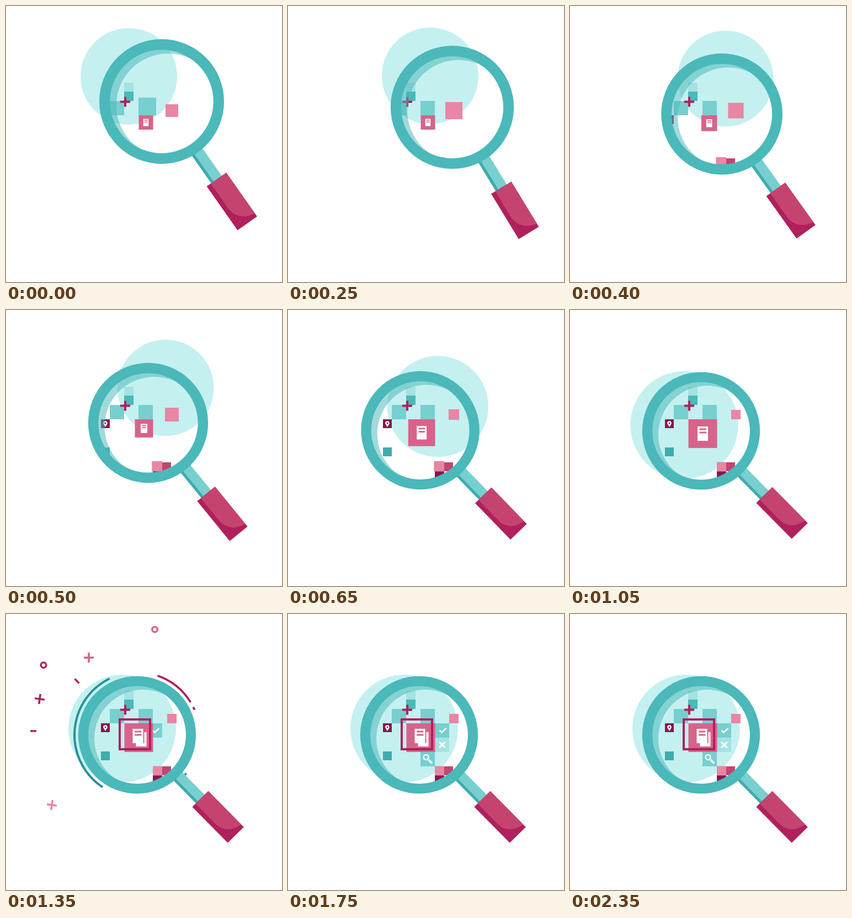
Animation of 500x500 px, one loop 2.4 s. Source, as an HTML page with a canvas:

```html
<!DOCTYPE html>
<html lang="en">
<head>
<meta charset="utf-8">
<title>Magnifier</title>
<style>
html, body { margin: 0; width: 100%; height: 100%; overflow: hidden; background: #fff; }
canvas { display: block; width: 500px; height: 500px; }
</style>
</head>
<body>
<canvas id="stage" width="500" height="500"></canvas>
<script>
const ctx = document.getElementById('stage').getContext('2d');
const LOOP = 2400, STEP = 50, DEG = Math.PI / 180;
const C = {
  pale: '#c4f0f0', ring: '#4bb8ba', teal: '#78cfcf', mist: '#a5e2e2', deep: '#3fabae', arc: '#2a9095',
  crimson: '#b0205c', rose: '#c4446f', pink: '#d6648a', light: '#e886a4', plum: '#85194f', white: '#fff'
};

// Rows: time, then values. Smooth curves run through every row.
const LENS = [
  [0, 282, 173, 1.06, 54.9], [250, 297.5, 183.5, 1.047, 58.65], [500, 257.5, 204.5, 1.019, 50.8],
  [750, 232.5, 224, 1, 43.7], [1000, 237.5, 219, 1, 45.4]
];
const DISC = [
  [0, 222.5, 127.5, 87.5], [250, 257.5, 126.5, 87.5], [500, 289, 141, 87.3],
  [750, 251.5, 196.5, 94.5], [950, 202, 209.5, 97.5], [1100, 210.5, 207.5, 97.5]
];
const BLOCK = [[0, 32], [250, 26]];
const DOT = [[0, 23], [250, 31], [500, 25], [750, 17]];
const BOOK = [[0, 26], [250, 26], [500, 33], [750, 57], [1000, 52]];
const CORNER = [[0, 18.5], [750, 18.5], [1000, 17]];
const LEFT_ARC = [[1100, 185, 185], [1350, 123.3, 244], [1650, 138, 190]];
const RIGHT_ARC = [[1100, -60, -60], [1350, -71, -31.4], [1650, -36, -26]];

// Kind, x, y, rotation, colour.
const SPARKS = [
  ['ring', 68, 92.5, 0, C.crimson], ['ring', 269.5, 28, 0, C.pink],
  ['plus', 150, 79, 0, C.pink], ['plus', 61, 154, 8, C.crimson], ['plus', 83, 346, 8, C.light],
  ['dash', 128.5, 121.5, 45, C.crimson], ['dash', 49.5, 212, 0, C.crimson]
];

const ramp = (t, a, b) => Math.min(1, Math.max(0, (t - a) / (b - a)));
const easeOut = p => 1 - (1 - p) ** 3;

function track(keys, t) {
  const last = keys.length - 1;
  if (t <= keys[0][0]) return keys[0].slice(1);
  if (t >= keys[last][0]) return keys[last].slice(1);
  let i = 0;
  while (t >= keys[i + 1][0]) i++;
  const a = keys[i], b = keys[i + 1], h = b[0] - a[0], p = (t - a[0]) / h;
  const slope = (k, j) => {
    if (k === last) return 0;
    const m = keys[Math.max(0, k - 1)], n = keys[k + 1];
    return (n[j] - m[j]) / (n[0] - m[0]) * h;
  };
  return a.slice(1).map((v, k) => {
    const j = k + 1, d = b[j] - v, u = slope(i, j), w = slope(i + 1, j);
    return v + p * (u + p * (3 * d - 2 * u - w + p * (u + w - 2 * d)));
  });
}

function box(x, y, w, h, color) {
  ctx.fillStyle = color;
  ctx.fillRect(x, y, w, h);
}
function disc(x, y, r, color) {
  ctx.beginPath();
  ctx.arc(x, y, r, 0, 7);
  ctx.fillStyle = color;
  ctx.fill();
}
function arc(x, y, r, from, to, width, color) {
  ctx.beginPath();
  ctx.arc(x, y, r, from * DEG, to * DEG);
  ctx.lineWidth = width;
  ctx.strokeStyle = color;
  ctx.stroke();
}
function line(points, width, color) {
  ctx.beginPath();
  for (let i = 0; i < points.length; i += 2) ctx.lineTo(points[i], points[i + 1]);
  ctx.lineWidth = width;
  ctx.strokeStyle = color;
  ctx.stroke();
}
function plus(x, y, r, width, color) {
  line([x - r, y, x + r, y], width, color);
  line([x, y - r, x, y + r], width, color);
}
function at(x, y, scale, angle, draw) {
  ctx.save();
  ctx.translate(x, y);
  ctx.rotate(angle * DEG);
  ctx.scale(scale, scale);
  draw();
  ctx.restore();
}

function drawPin() {
  box(172, 198, 16, 16, C.plum);
  ctx.beginPath();
  ctx.arc(180, 205, 3.8, 160 * DEG, 20 * DEG);
  ctx.lineTo(180, 212);
  ctx.fillStyle = C.white;
  ctx.fill();
  disc(180, 205, 1.5, C.plum);
}

function drawTiles(t) {
  const away = start => 26 * (1 - easeOut(ramp(t, start, start + 240)));
  if (t >= 1300) {
    at(-away(1280), 0, 1, 0, () => {
      box(266, 198, 26, 26, C.teal);
      line([274.5, 211, 278.5, 214.5, 286.5, 207], 2.6, C.white);
    });
  }
  if (t >= 1400) {
    at(-away(1380), 0, 1, 0, () => {
      box(266, 224, 26, 26, C.mist);
      line([274.5, 232, 284.5, 242], 3, C.white);
      line([284.5, 232, 274.5, 242], 3, C.white);
    });
  }
  if (t >= 1450) {
    at(0, -away(1420), 1, 0, () => {
      box(240, 250, 26, 26, C.teal);
      arc(250, 259.5, 4.4, 0, 360, 2.5, C.white);
      line([254.5, 264, 261, 270.5], 3.8, C.white);
    });
  }
}

function drawBook(t) {
  const [size] = track(BOOK, t), open = easeOut(ramp(t, 1050, 1250));
  box(266.5 - size, 198, size, size, C.pink);
  if (open) {
    const x = 214 - 8 * open, y = 198 - 7 * open;
    ctx.lineWidth = 4;
    ctx.strokeStyle = C.crimson;
    ctx.strokeRect(x, y, 55, 54);
  }
  at(266.5 - size / 2 - 1.5 * open, 198 + size / 2 - 3 * open, size / 52, 0, () => {
    if (open) {
      const d = 6 * open;
      box(-9.5 + d, -13 + d, 19, 26, C.white);
      box(-11.5, -15, 23, 25 + d / 2, C.pink);
      if (open < 1) box(-9.5, -13, 19, 26, C.white);
    }
    box(-9.5, -13, 19, 26, C.white);
    box(-6, -9.5, 12.5, 3, C.pink);
    box(-6, -3.5, 12.5, 3, C.pink);
  });
}

function drawContent(t) {
  const [block] = track(BLOCK, t), [dot] = track(DOT, t), [corner] = track(CORNER, t);
  box(214, 139, 17, 16.5, C.mist);
  box(214, 155, 17, 17, C.ring);
  box(188, 172, 26, 26, C.teal);
  box(240, 198 - block, block, block, C.teal);
  plus(216, 173.5, 9, 4, C.crimson);
  drawPin();
  box(172, 249, 16, 16, C.deep);
  box(266, 292, 17, 17, C.plum);
  box(283, 276, 16, 16, C.rose);
  box(283 - corner, 292.5 - corner, corner, corner, C.light);
  box(300.5 - dot / 2, 189.5 - dot / 2, dot, dot, C.light);
  drawTiles(t);
  drawBook(t);
}

function drawHandle() {
  box(95, -11, 70, 22, C.teal);
  box(95, 6, 70, 5, C.deep);
  box(163, -20.4, 91.5, 40.8, C.crimson);
  ctx.beginPath();
  ctx.moveTo(163, -20.4);
  ctx.lineTo(163, 12);
  ctx.lineTo(217, 12);
  ctx.quadraticCurveTo(243, 9, 248, -20.4);
  ctx.fillStyle = C.rose;
  ctx.fill();
}

function drawBurst(t, cx, cy) {
  if (t < 1150 || t > 1650) return;
  const reach = t < 1350 ? 0.6 + 0.4 * easeOut(ramp(t, 1100, 1350)) : 1 + 0.035 * ramp(t, 1350, 1550);
  const scale = Math.min(ramp(t, 1100, 1250), 1 - ramp(t, 1450, 1700));
  for (const [kind, x, y, angle, color] of SPARKS) {
    at(cx + (x - cx) * reach, cy + (y - cy) * reach, scale, angle, () => {
      if (kind === 'ring') arc(0, 0, 4.8, 0, 360, 3.4, color);
      else if (kind === 'plus') plus(0, 0, 9, 3.6, color);
      else line([-5.5, 0, 5.5, 0], 3.5, color);
    });
  }
  arc(cx, cy, 113.5, ...track(LEFT_ARC, t), 4, C.arc);
  arc(cx, cy, 113.5, ...track(RIGHT_ARC, t), 3.8, C.crimson);
  if (t >= 1300) {
    arc(cx, cy, 113.5, -26.4, -23.6, 3.8, C.crimson);
    arc(cx, cy, 113, 38, 40.5, 4, C.arc);
  }
}

function draw(t) {
  const [cx, cy, scale, angle] = track(LENS, t);
  const inner = 88.5 * scale;
  box(0, 0, 500, 500, C.white);
  disc(...track(DISC, t), C.pale);
  drawBurst(t, cx, cy);

  ctx.save();
  ctx.beginPath();
  ctx.arc(cx, cy, inner + 1, 0, 7);
  ctx.clip();
  drawContent(t);
  // Shade everything outside the shifted glass circle.
  ctx.beginPath();
  ctx.rect(0, 0, 500, 500);
  ctx.arc(cx + 11 * scale, cy + 6.5 * scale, inner, 0, 7);
  ctx.fillStyle = 'rgba(75,184,186,.52)';
  ctx.fill('evenodd');
  ctx.restore();

  at(cx, cy, scale, angle, drawHandle);
  arc(cx, cy, 97.5 * scale, 0, 360, 18.2 * scale, C.ring);
}

const start = performance.now();
function tick() {
  const t = (performance.now() - start) % LOOP;
  draw(Math.floor(t / STEP) * STEP);
  requestAnimationFrame(tick);
}
tick();
</script>
</body>
</html>
```
